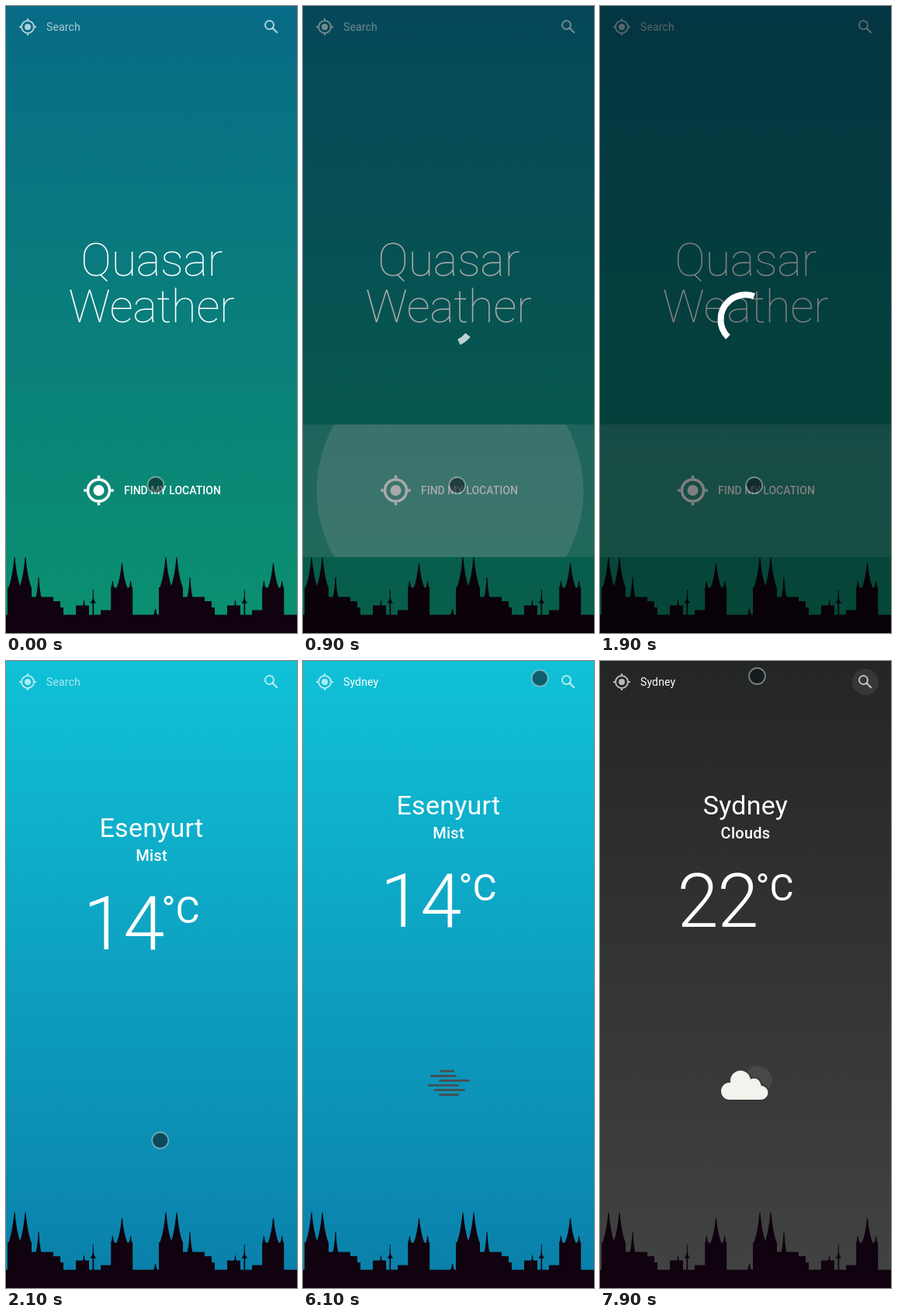
Write an HTML page with a canvas that moves like this. It is 375x809 px and loops after 8000 ms.

```html
<!DOCTYPE html>
<html lang="en">
<head>
<meta charset="utf-8">
<title>Weather app</title>
<style>
html, body { margin: 0; width: 100%; height: 100%; overflow: hidden; background: #086c86; }
canvas { display: block; }
</style>
</head>
<body>
<canvas id="stage" width="375" height="809"></canvas>
<script>
const ctx = document.getElementById('stage').getContext('2d');
const W = 375, H = 809, LOOP = 8000, STEP = 100, TAU = Math.PI * 2;

const clamp = x => Math.max(0, Math.min(1, x));
const smooth = x => x * x * (3 - 2 * x);
const mix = (a, b, k) => a + (b - a) * k;
const white = a => `rgba(255,255,255,${a})`;

// Each move: start, end, target x, target y
const cursorStart = [193, 618];
const cursorMoves = [
  [100, 200, 243, 618], [400, 500, 198.7, 618.5], [2300, 2700, 242, 46],
  [2800, 3100, 203.5, 33.5], [5600, 6360, 343, 18], [7100, 7700, 202.5, 19.5]
];

// One tile of the skyline, repeated every 195 px
const skyline = new Path2D();

function block(left, right, top) {
  skyline.rect(left, top, right - left, H - top);
}

function spire(x, tip, half, base) {
  const bend = mix(base, tip, 0.36);
  skyline.moveTo(x - half, base);
  skyline.quadraticCurveTo(x - half / 3, bend, x - 0.5, tip);
  skyline.lineTo(x + 0.5, tip);
  skyline.quadraticCurveTo(x + half / 3, bend, x + half, base);
  skyline.closePath();
}

block(0, 195, 785.5);
// cathedral
block(2, 33, 750);
block(33, 61, 762.5);
block(61, 70, 768);
block(70, 74, 776);
for (const x of [11, 25]) spire(x, 711.5, 7.5, 750);
spire(42, 737, 3.5, 763);
// hall and television tower
block(90, 107, 773.5);
spire(100.5, 767, 1.5, 774);
block(111.5, 113.2, 766);
spire(112.3, 753, 1, 767);
spire(112.3, 764, 4, 770.5);
// church
block(122, 136, 779.5);
block(135.2, 163.2, 750.5);
spire(149.5, 719, 7, 751);
for (const x of [137.4, 160.6]) spire(x, 742, 2.3, 751);
spire(192.5, 778, 3, 786);

const cloud = new Path2D();
for (const [x, y, r] of [[167, 555, 11], [181, 541.5, 13], [198.5, 547, 8.5], [207.5, 557, 9]]) {
  cloud.moveTo(x + r, y);
  cloud.arc(x, y, r, 0, TAU);
}
cloud.rect(167, 546, 40.5, 20);

function disc(x, y, r, fill) {
  ctx.beginPath();
  ctx.arc(x, y, r, 0, TAU);
  ctx.fillStyle = fill;
  ctx.fill();
}

function ring(x, y, r, width, stroke, from = 0, to = TAU) {
  ctx.beginPath();
  ctx.arc(x, y, r, from, to);
  ctx.lineWidth = width;
  ctx.strokeStyle = stroke;
  ctx.stroke();
}

function line(x1, y1, x2, y2, width, stroke, cap = 'butt') {
  ctx.beginPath();
  ctx.moveTo(x1, y1);
  ctx.lineTo(x2, y2);
  ctx.lineWidth = width;
  ctx.lineCap = cap;
  ctx.strokeStyle = stroke;
  ctx.stroke();
}

function label(str, x, y, size, { weight = 400, align = 'left', spacing = 0, fill = '#fff' } = {}) {
  ctx.font = `${weight} ${size}px Roboto, sans-serif`;
  ctx.letterSpacing = spacing * size + 'px';
  ctx.textAlign = align;
  ctx.fillStyle = fill;
  ctx.fillText(str, x, y);
}

function background(top, bottom) {
  const g = ctx.createLinearGradient(0, 0, 0, H);
  g.addColorStop(0, top);
  g.addColorStop(1, bottom);
  ctx.fillStyle = g;
  ctx.fillRect(0, 0, W, H);
}

function locationIcon(x, y, size, fill) {
  const u = size / 24;
  disc(x, y, 4 * u, fill);
  ring(x, y, 8 * u, 2 * u, fill);
  for (const [dx, dy] of [[1, 0], [-1, 0], [0, 1], [0, -1]])
    line(x + dx * 9 * u, y + dy * 9 * u, x + dx * 11 * u, y + dy * 11 * u, 2 * u, fill);
}

function searchBar(now) {
  const soft = white(0.68);
  locationIcon(28, 27, 24, soft);
  ring(339.5, 24.5, 5.5, 2, soft);
  line(343.4, 28.4, 349.8, 34.8, 2.2, soft);
  const typed = 'Sydney'.slice(0, Math.max(0, 1 + Math.floor((now - 4400) / 150)));
  label(typed || 'Search', 52, 32, 14, { spacing: 0.00937, fill: typed ? '#fff' : white(0.66) });
  const blinkedOff = now >= 4200 && now < 4400;
  if (now >= 3900 && now < 5700 && !blinkedOff) {
    const x = 52.5 + (typed ? ctx.measureText(typed).width : 0);
    line(x, 19, x, 35, 1, '#fff');
  }
}

// Focus tint plus a ripple growing inside the given shape
function press(shape, x, y, radius, tint, t) {
  ctx.save();
  ctx.clip(shape);
  ctx.fillStyle = white(tint * clamp(t / 0.1));
  ctx.fillRect(0, 0, W, H);
  const grow = 1 - (1 - clamp((t - 0.03) / 0.225)) ** 2;
  const fade = 1 - clamp((t - 0.22) / 0.12);
  disc(x, y, radius * grow, white(0.2 * fade));
  ctx.restore();
}

function loading(t) {
  ctx.fillStyle = `rgba(0,0,0,${0.5 * clamp(t / 0.24)})`;
  ctx.fillRect(0, 0, W, H);
  const dash = 2 * (t / 0.75) ** 2;
  const from = t * Math.PI + dash * 35 / 20;
  ring(187.5, 404.5, 32, 8, white(clamp(t / 0.22)), from, from + (1 + 88 * dash) / 20);
}

function home(t) {
  background('#086b87', '#0b9170');
  const title = { weight: 100, align: 'center', spacing: -0.00833 };
  label('Quasar', W / 2, 348, 60, title);
  label('Weather', W / 2, 408, 60, title);
  locationIcon(119.5, 625, 42, '#fff');
  label('FIND MY LOCATION', 152, 630, 14, { weight: 500 });
  if (t > 0) {
    const button = new Path2D();
    button.roundRect(0, 540, W, 171, 3);
    press(button, 189.5, 625.5, 207, 0.15, t);
  }
}

function weather(city, sky, degrees, dy) {
  label(city, W / 2, 198 + dy, 34, { align: 'center', spacing: 0.00735 });
  label(sky, W / 2, 229 + dy, 20, { weight: 500, align: 'center', spacing: 0.0125 });
  label(degrees, 99.4, 342.5 + dy, 96, { weight: 300, spacing: -0.01562 });
  label('°C', 200.5, 309 + dy, 48);
}

function mistIcon() {
  [185.5, 181, 195, 181, 189, 188].forEach((x, i) => {
    const half = Math.min(20, 9.5 + 7.5 * i, 13 + 7 * (5 - i)) - 1.4;
    const y = 529.2 + i * 6.1;
    line(x - half, y, x + half, y, 2.7, '#484b4f', 'round');
  });
}

function cloudIcon() {
  disc(203.5, 540.5, 18, '#484848');
  ctx.lineWidth = 4;
  ctx.strokeStyle = '#373838';
  ctx.stroke(cloud);
  ctx.fillStyle = '#f2f3ed';
  ctx.fill(cloud);
}

function cursor(now) {
  if (now >= 4400 && now < 5700) return;
  let [x, y] = cursorStart;
  for (const [start, end, toX, toY] of cursorMoves) {
    const k = smooth(clamp((now - start) / (end - start)));
    x = mix(x, toX, k);
    y = mix(y, toY, k);
  }
  disc(x, y, 10, 'rgba(10,22,24,0.56)');
  ring(x, y, 10.5, 1.8, 'rgba(175,190,190,0.6)');
}

function draw(now) {
  // The loading phases run at a quarter of real speed
  let t = 0;
  if (now >= 500 && now < 2100) t = (now - 250) / 4000;
  if (now >= 6600 && now < 7400) t = (now - 6350) / 4000;

  if (now < 2100) {
    home(t);
  } else if (now < 7400) {
    background('#10c1d7', '#0a7fa9');
    weather('Esenyurt', 'Mist', '14', now < 2400 ? 29 : 0);
    if (now >= 2400) mistIcon();
  } else {
    background('#242626', '#424343');
    weather('Sydney', 'Clouds', '22', 0);
    cloudIcon();
  }
  searchBar(now);
  if (now >= 6600) {
    const button = new Path2D();
    button.arc(342, 27, 17, 0, TAU);
    press(button, 342, 27, 17, 0.08, t || 1);
  }
  ctx.fillStyle = '#10020e';
  for (const x of [0, 195]) {
    ctx.save();
    ctx.translate(x, 0);
    ctx.fill(skyline);
    ctx.restore();
  }
  if (t > 0) loading(t);
  cursor(now);
}

function tick() {
  const now = performance.now() % LOOP;
  draw(Math.floor(now / STEP) * STEP);
  requestAnimationFrame(tick);
}
tick();
</script>
</body>
</html>
```
